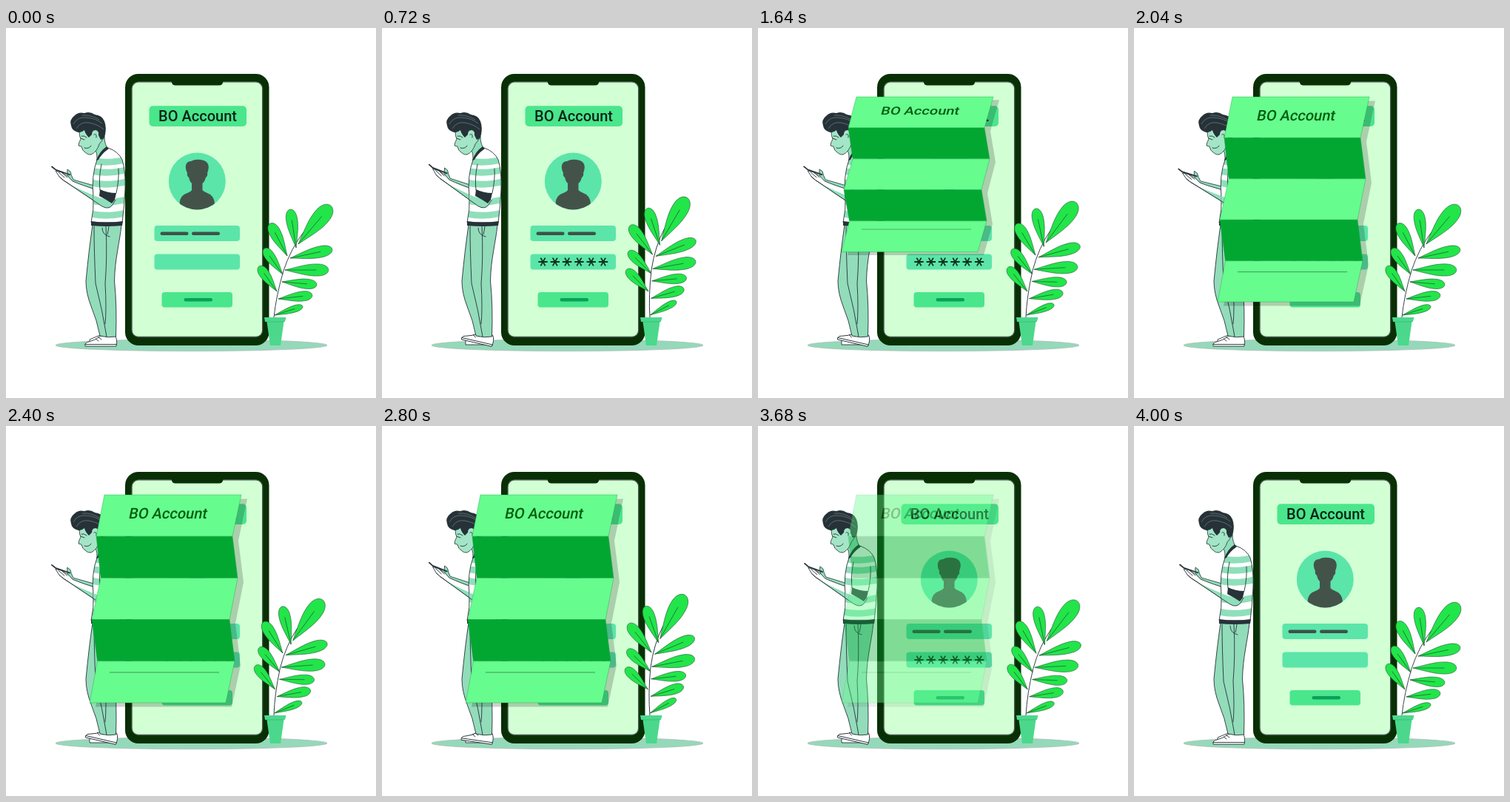
An HTML page that plays this animation: 500x500 px, repeating every 4.04 s.

```html
<!DOCTYPE html>
<html lang="en">
<head>
<meta charset="utf-8">
<title>Account form</title>
<style>
  html, body { margin: 0; width: 100%; height: 100%; overflow: hidden; background: #fff; }
  svg { display: block; width: 100vw; height: 100vh; }
  text { font: 500 20px Roboto, Arial, sans-serif; }
  .ink { fill: none; stroke: #263238; stroke-width: .9; stroke-linecap: round; stroke-linejoin: round; }
  .dark { fill: #263238; }
  .skin { fill: #8fdfba; stroke: #263238; stroke-width: .8; stroke-linejoin: round; }
  .face { fill: #a3e6c7; }
  .white { fill: #fff; stroke: #263238; stroke-width: .9; stroke-linejoin: round; }
  .field { fill: #5be5a9; }
  .button { fill: #4ae68c; }
  .leaf { fill: #22e54a; stroke: #2b5a3c; stroke-width: .6; }
</style>
</head>
<body>
<svg viewBox="0 0 500 500">
  <defs>
    <clipPath id="avatar"><circle cx="258.3" cy="207" r="38.5"/></clipPath>
    <clipPath id="torso"><path id="shirtShape" d="M123 178Q128 168 138 162Q152 167 157 178Q162 195 161 218Q160 240 157 263L115 263Q119 245 118 228Q115 200 123 178Z"/></clipPath>
  </defs>

  <ellipse cx="250.5" cy="428.7" rx="183.5" ry="8" fill="#94d9b9" stroke="#b0bdb7" stroke-width=".8"/>

  <!-- phone -->
  <rect x="161" y="62" width="194.5" height="367" rx="18" fill="#092f05"/>
  <rect x="170" y="72.8" width="176.7" height="344.7" rx="9" fill="#d2ffd4" stroke="#44544c" stroke-width="1.3"/>
  <path d="M222 71H295Q293 72 293 74Q292 77.5 288 77.5H229Q225 77.5 224 74Q224 72 222 71Z" fill="#092f05"/>
  <rect class="button" x="193.5" y="105.3" width="131.5" height="27.7" rx="5"/>
  <text x="206" y="126" fill="#0d2417">BO Account</text>
  <circle class="field" cx="258.3" cy="207" r="38.5"/>
  <g fill="#44534a" clip-path="url(#avatar)">
    <path d="M245 196Q241 188 244 183Q246 180 250 180Q255 177 263 178Q271 179 273 184Q275 189 272 196Q273 200 270 202Q269 207 265.500 210V219Q267 221 272 223Q281 226 282 237V247H234.500V237Q235 226 245 223Q250 221 251 219V210Q248 207 247 202Q244 200 245 196Z"/>
  </g>
  <rect class="field" x="200.5" y="267" width="115.5" height="21" rx="4"/>
  <rect x="208.5" y="275.5" width="38" height="4.5" rx="2.2" fill="#3e5149"/>
  <rect x="251" y="275.5" width="38" height="4.5" rx="2.2" fill="#3e5149"/>
  <rect class="field" x="200.5" y="305.5" width="115.5" height="21" rx="4"/>
  <g id="stars" stroke="#12301c" stroke-width="1.8"></g>
  <rect class="button" x="210.5" y="357" width="95.5" height="20.5" rx="4"/>
  <rect x="240.5" y="365" width="38.5" height="4.5" rx="2.2" fill="#0ba05a"/>

  <!-- man -->
  <path class="white" d="M113 428V421Q122 417 130 414L140 415L141 428Z"/>
  <g id="foot">
    <path class="white" d="M107 430Q106 425 112 424Q121 422 128 416L147 415Q151 421 149 430Z"/>
    <path class="ink" d="M107 427.5H149.5M121 420l4 3M125 418l4 3"/>
  </g>
  <path d="M117 266H156C154 288 147 312 146.500 342Q150 376 148.500 417Q138 419 127 416Q123 395 115 376Q108 358 108 342Q112 300 117 266Z" fill="#92dcba" stroke="#263238" stroke-width=".9"/>
  <path class="ink" d="M119 268Q119 300 121 345Q130 380 136 417M135 268Q137 310 134 345Q136 380 134 400M139 268Q138 275 137 279M130 270Q130 280 140 282"/>
  <path class="skin" d="M118 160L133 146Q133 158 138 163Q132 174 123 178Q123 170 122 168Z"/>
  <path class="skin face" d="M99 139Q99 147 101 150Q98 155 98 159L102 160Q103 166 107 168Q111 172 115 171Q123 167 126 157L132 149L128 133L106 131Z"/>
  <path class="dark" d="M88 132Q85 124 93 118Q98 113 106 115Q113 112 120 117Q130 118 133 126Q136 134 134 144Q133 150 128 151L125 145Q126 139 121 138Q116 138 116 144L112 148Q107 143 106 138Q100 143 95 140Q89 138 88 132Z"/>
  <path d="M91 130Q96 120 108 121Q122 122 130 129M95 136Q101 126 112 128Q124 130 132 137M103 118Q115 117 126 124" fill="none" stroke="#71858a" stroke-width=".7"/>
  <path class="ink" d="M101 149l5 2M109 148q-3-3-7-2M106 162Q112 164 115 159M119 144q4-2 3 4"/>

  <g id="arms">
    <path class="skin" d="M119 213L91 205Q88 199 87 194L83 191Q82 195 84 201L88 208L120 222Z"/>
    <path class="white" d="M67 193L72 201Q77 206 84 210L130 241Q139 246 144 239L149 229L127 220Q104 213 90 207Q84 199 75 195Z"/>
    <path d="M84 210Q104 221 124 228Q138 233 147 232L144 239Q139 246 130 241Z" fill="#8fdfba"/>
    <path class="ink" d="M72 201Q77 206 84 210L130 241Q139 246 144 239M71 195l8 7M75 195l8 7"/>
    <path d="M61.5 187L67 191.5L87 198.5" fill="none" stroke="#263238" stroke-width="1.7"/>
  </g>

  <use href="#shirtShape" fill="#fff"/>
  <g id="stripes" clip-path="url(#torso)" fill="none" stroke="#8fdfba" stroke-width="9"></g>
  <use href="#shirtShape" class="ink"/>
  <path class="dark" d="M122 179Q126 167 136 160L139 163Q129 170 125 178ZM115 261Q136 264 158 261L157 267Q136 269 115 267Z"/>
  <!-- forearm in front of the shirt -->
  <g id="elbow">
    <path d="M118 227L127 219L149 230L144 239Q139 246 130 241L118 233Z" fill="#fff"/>
    <path d="M118 226Q134 233 147 232L144 239Q139 246 130 241L118 233Z" fill="#8fdfba"/>
    <path class="ink" d="M118 233L130 241Q139 246 144 239L148 232"/>
  </g>
  <path class="dark" d="M127 218Q137 223 149 223L147 232L143 237Q134 231 126 227Z"/>
  <path class="ink" d="M129 184Q125 203 127 219M149 223Q153 205 152 190"/>

  <!-- folded sheet -->
  <g id="sheet">
    <path id="shade" fill="#000" opacity=".19"/>
    <g id="panels"></g>
    <path id="rule" stroke="#3f9a55"/>
    <text id="heading" x="171.5" y="32" fill="#045f10">BO Account</text>
  </g>

  <!-- plant -->
  <g id="plant">
    <path class="ink" d="M362 391Q365 362 375 328Q385 298 402 276"/>
    <g id="leaves"></g>
  </g>
  <path d="M349 391H378.5L377 397H375.5L371 429H357L352.5 397H350Z" fill="#4bd88d"/>
  <path d="M352.5 397H375.5" stroke="#35b873" stroke-width=".8"/>
</svg>

<script>
const $ = id => document.getElementById(id);
const LOOP = 4040, STEP = 40;
const clamp = v => Math.max(0, Math.min(1, v));
const span = (t, a, b) => clamp((t - a) / (b - a));
const smooth = p => (1 - Math.cos(Math.PI * p)) / 2;
const wave = (t, period) => (1 - Math.cos(2 * Math.PI * t / period)) / 2;
const points = list => "M" + list.map(p => p.join(" ")).join("L") + "Z";

// base x, base y, tip x, tip y, width
const leaves = [
  [395, 292, 439, 240, 22], [392, 297, 384, 245, 15], [380, 308, 357, 264, 15],
  [384, 311, 441, 299, 15], [374, 333, 349, 298, 13], [377, 327, 436, 327, 16],
  [373, 343, 420, 347, 13], [366, 356, 342, 322, 13], [368, 366, 414, 361, 13],
  [363, 388, 401, 376, 9]
];

function leaf([x, y, tx, ty, w]) {
  const len = Math.hypot(tx - x, ty - y);
  const angle = Math.atan2(ty - y, tx - x) * 180 / Math.PI;
  const at = (u, v) => `${u * len} ${v * w} `;
  const d = "M0 0C" + at(.35, -.32) + at(.55, -.55) + at(.78, -.5) +
    "C" + at(1.07, -.42) + at(1.07, .42) + at(.78, .5) +
    "C" + at(.55, .55) + at(.35, .32) + "0 0Z";
  return `<g transform="translate(${x} ${y}) rotate(${angle})">
    <path class="leaf" d="${d}"/>
    <path d="M0 0H${len * .72}" stroke="#1d6b35" stroke-width=".8"/></g>`;
}
$("leaves").innerHTML = leaves.map(leaf).join("");

$("stripes").innerHTML = [178, 192, 208, 232, 250]
  .map(y => `<path d="M110 ${y}Q136 ${y + 7} 166 ${y - 1}"/>`).join("");

$("stars").innerHTML = [0, 1, 2, 3, 4, 5].map(i =>
  `<path transform="translate(${217.5 + i * 16.3} 316)" d="M-6.2 0H6.2M-3.1-5.4L3.1 5.4M3.1-5.4L-3.1 5.4"/>`).join("");
const stars = [...$("stars").children];

const left = [133, 122, 128, 116, 123.5, 113];
const right = [318, 306, 313, 302, 309, 297];
const TOP = 93, PANEL = 56.2;
$("panels").innerHTML = [0, 1, 2, 3, 4].map(i =>
  `<path fill="${i % 2 ? "#02a732" : "#66fc8e"}" stroke="#1f9c45" stroke-width=".4"/>`).join("");
const panels = [...$("panels").children];

// time and tilt of the raised forearms, in degrees
const tilt = [[0, 0], [720, 2], [1000, 4.2], [1320, 2], [2040, -2.2], [2800, 2], [3120, 3.2], [3440, 2], [4000, 0], [4040, 0]];
function tiltAt(t) {
  const i = tilt.findIndex(k => k[0] > t);
  const [a, b] = [tilt[i - 1], tilt[i]];
  return a[1] + (b[1] - a[1]) * (t - a[0]) / (b[0] - a[0]);
}

function drawSheet(t) {
  const open = 1 - (1 - span(t, 1266, 2286)) ** 3;
  const alpha = 1 - smooth(span(t, 3360, 3920));
  $("sheet").style.display = open > 0 && alpha > 0 ? "" : "none";
  $("sheet").setAttribute("opacity", alpha);
  const y = i => TOP + i * PANEL * open;
  panels.forEach((p, i) => p.setAttribute("d", points([
    [left[i], y(i)], [right[i], y(i)], [right[i + 1], y(i + 1)], [left[i + 1], y(i + 1)]])));
  const outline = right.map((x, i) => [x, y(i)]).concat(left.map((x, i) => [x, y(i)]).reverse());
  $("shade").setAttribute("d", points(outline));
  $("shade").setAttribute("transform", `translate(8 ${1 + 4.5 * open})`);
  $("rule").setAttribute("d", `M140 ${y(4.27)}H288`);
  $("rule").setAttribute("stroke-width", open);
  $("heading").setAttribute("transform", `matrix(1 0 -.2 ${open} 0 ${TOP})`);
}

function draw(t) {
  $("plant").setAttribute("transform", `rotate(${-12 * wave(t, 2000)} 362 391)`);
  $("foot").setAttribute("transform", `rotate(${13 * smooth(clamp(wave(t, 1000) * 1.7))} 147 427)`);
  const turn = `rotate(${tiltAt(t)} 142 236)`;
  $("arms").setAttribute("transform", turn);
  $("elbow").setAttribute("transform", turn);
  stars.forEach((s, i) => {
    s.style.display = t >= 120 + i * 80 && t < 3960 ? "" : "none";
  });
  drawSheet(t);
}

const start = performance.now();
function tick() {
  const t = (performance.now() - start) % LOOP;
  draw(Math.floor(t / STEP) * STEP);
  requestAnimationFrame(tick);
}
draw(0);
requestAnimationFrame(tick);
</script>
</body>
</html>
```
